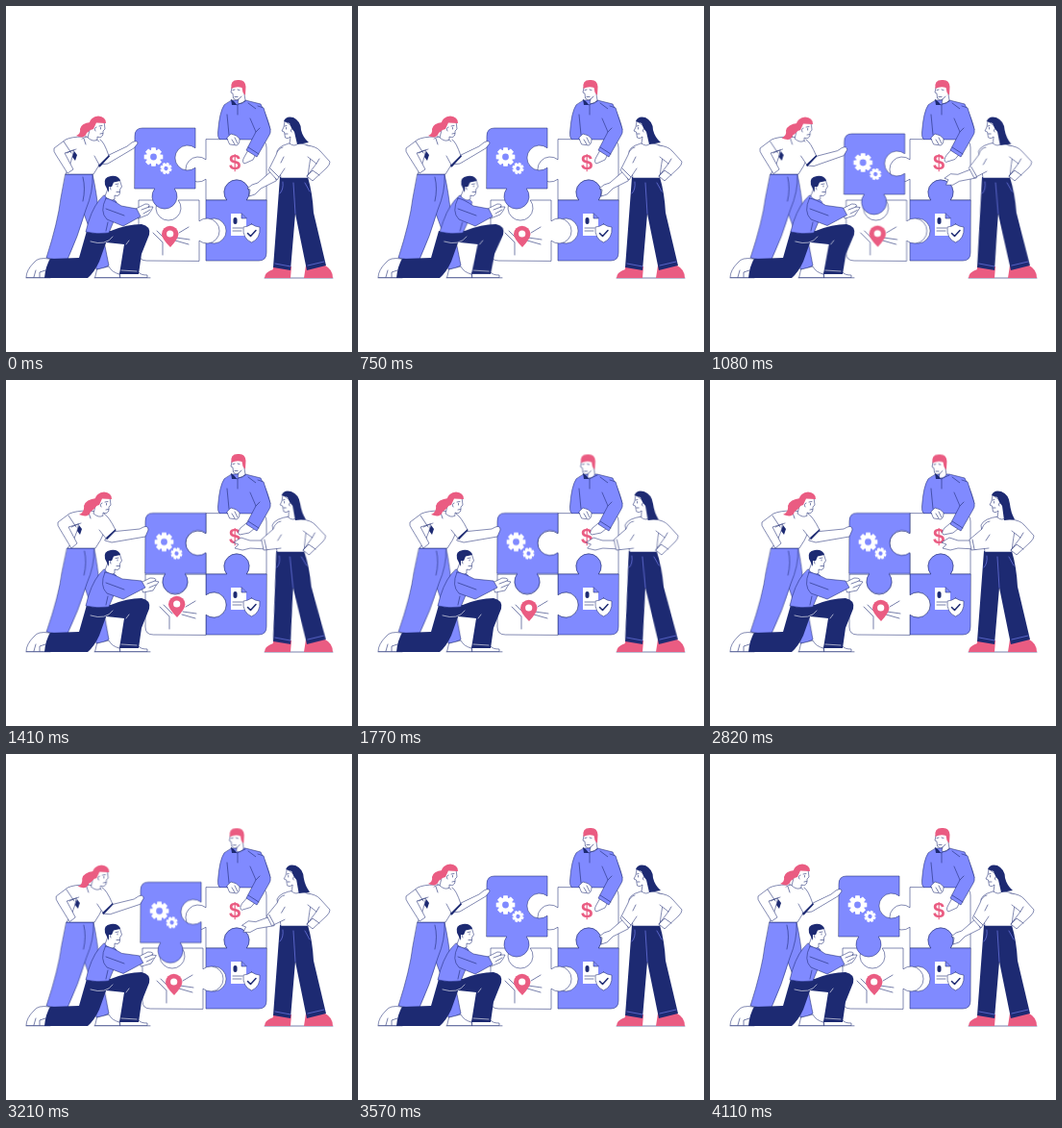
These frames come from a looping animation (360 px wide and 360 px high, 4.14 s). An HTML page:

```html
<!DOCTYPE html>
<html lang="en">
<head>
<meta charset="utf-8">
<title>Team puzzle</title>
<style>
html, body { margin: 0; width: 100%; height: 100%; overflow: hidden; background: #fff; }
svg {
  --ink: #1d2a72; --blue: #808aff; --pink: #ea5c82;
  display: block; width: 100vw; height: 100vh;
  stroke-linejoin: round; stroke-linecap: round;
}
.w, .b { stroke: var(--ink); stroke-width: .55; }
.w { fill: #fff; }
.b { fill: var(--blue); }
.n { fill: var(--ink); }
.p { fill: var(--pink); }
.l { fill: none; stroke: var(--ink); stroke-width: .6; }
.x { fill: none; stroke: #fff; stroke-width: .6; }
.move, .skew, .morph, .nod, .lean, .push, .hop { animation: 4140ms ease-in-out infinite; }
.move { animation-name: move; }
.skew { animation-name: skew; transform-origin: 70px 272px; }
.morph { d: var(--a); animation-name: morph; }
.nod { animation-name: nod; }
.lean { animation-name: lean; transform-origin: 305px 274px; }
.push { animation-name: push; transform-origin: 110px 281px; }
.hop { animation-name: hop; }
/* apart, together, apart */
@keyframes move {
  0%, 19%, 85%, 100% { transform: translate(0, 0); }
  33%, 71% { transform: translate(var(--x), var(--y, 0px)); }
}
@keyframes skew {
  0%, 19%, 85%, 100% { transform: skewX(0deg); }
  33%, 71% { transform: skewX(-1deg); }
}
@keyframes morph {
  0%, 19%, 85%, 100% { d: var(--a); }
  33%, 71% { d: var(--b); }
}
@keyframes nod {
  0%, 34%, 85%, 100% { transform: translate(0, 0); }
  46%, 71% { transform: translate(-3px, .5px); }
}
@keyframes lean {
  0%, 19%, 67%, 100% { transform: skewX(0deg); }
  33% { transform: skewX(2.3deg); }
  53% { transform: skewX(1.6deg); }
}
@keyframes push {
  0%, 5%, 33%, 100% { transform: skewX(0deg); }
  18% { transform: skewX(-2.7deg); }
}
@keyframes hop {
  0%, 24%, 42%, 100% { transform: translateY(0); }
  34% { transform: translateY(-4px); }
}
</style>
</head>
<body>
<svg viewBox="0 0 360 360">
<defs>
  <path id="piece" d="M145 147Q145 139 153 139H208V159.8A13 13 0 1 0 208 180.2V202H186.2A13 13 0 1 1 165.8 202H145Z"/>
  <path id="tooth" d="M-2.2-9.8H2.2L2.8-5H-2.8Z"/>
  <g id="gear">
    <circle r="5.4" fill="none" stroke="#fff" stroke-width="4"/>
    <g fill="#fff">
      <use href="#tooth"/><use href="#tooth" transform="rotate(45)"/>
      <use href="#tooth" transform="rotate(90)"/><use href="#tooth" transform="rotate(135)"/>
      <use href="#tooth" transform="rotate(180)"/><use href="#tooth" transform="rotate(225)"/>
      <use href="#tooth" transform="rotate(270)"/><use href="#tooth" transform="rotate(315)"/>
    </g>
  </g>
</defs>

<path class="l" d="M21 282.8H46M92 282.8H150M269 283H340"/>

<!-- standing woman, left -->
<g class="skew">
  <path class="b" d="M77 175H90Q94 192 97 220L107 270Q101 274 94 274L88 235L77 205Z"/>
  <path class="b" d="M62 175H90Q91 193 83 212Q75 240 63 266L42 262Q54 225 57 200Z"/>
  <path class="l" d="M80 178Q83 190 80 203"/>
</g>
<path class="w" d="M95 274L107 271Q110 277 118 279L119 282.5H93Z"/>
<path class="w morph" style="--a:path('M83 136Q98 138 101 146Q103 158 91 175H62Q67 166 69 157Q71 140 83 136Z');--b:path('M88 136Q102 138 104 146Q105 158 93 175H64Q72 166 74 157Q76 140 88 136Z')"/>
<path class="w morph" style="--a:path('M80 136Q68 136 62 139L50 148Q49 151 52 155L64 174L70 170L61 153L73 149');--b:path('M85 136Q73 136 66 139L54 148Q53 151 56 155L68 175L74 170L65 153L78 149')"/>
<g class="move" style="--x:5px">
  <path class="l" d="M60 141L68 153M81 138L83 144M63 153L70 150"/>
  <path class="n" d="M69 157L71 151L74 155L72 161Z"/>
</g>
<g class="move" style="--x:6px;--y:2px">
  <path class="w" d="M88 125L85 137Q91 142 95 139L95 136Q100 138 101 133L101 130L103 128L102 120L91 118Z"/>
  <path class="p" d="M86 123Q88 115 96 114.500Q104 115 104 122L94 121.500L91 128L88 129Z"/>
  <path class="l" d="M97 125L100 124.500M98.500 126.500V128M98 133L100.500 132.500M94 126Q91 127 93 130"/>
</g>
<path class="p morph" style="--a:path('M88 121Q78 122 77 128Q78 133 73 135Q82 139 84 132Q88 130 90 125Z');--b:path('M94 123Q83 124 81 131Q82 137 76 140Q86 144 88 137Q94 133 96 128Z')"/>

<!-- man behind the puzzle -->
<path class="b" d="M235 98L249 98L265 102Q273 118 275 129L262 140H226Q220 140 220.500 132Q222 110 227 103Z"/>
<g class="nod">
  <path class="w" d="M235 85L234 90L236 91L236.500 96Q239 99 242 97L241 101Q246 103 249 98L248 92V82H237Z"/>
  <path class="p" d="M234.500 86Q233 77 241 77Q249 76 249.500 84L249 93L246.500 90L245.500 85Q240 83 234.500 86Z"/>
  <path class="l" d="M236 87.500L238 87M241 87L243 87.500M238 94.500H241M242 97L245 94"/>
</g>
<path class="l" d="M234 97.500L240 103L249 99M241 103V113M252 101L260 107M230 113L232 134"/>
<path class="n" d="M234 97L238 100L240 103L235 103Z"/>

<!-- puzzle -->
<use href="#piece" class="w" transform="rotate(90 208 202)"/>
<text x="238" y="170" text-anchor="middle" fill="#ea5c82" font-family="'Liberation Sans', Arial, sans-serif" font-size="22" font-weight="700">$</text>
<use href="#piece" class="b" transform="rotate(180 208 202)"/>
<path fill="#fff" d="M234 216H245L250 221V239H234Z"/>
<path class="b" d="M245 216V221H250Z"/>
<rect class="n" x="236.5" y="220" width="4" height="7" rx="2"/>
<path class="l" d="M236 231H246M236 234H245"/>
<path class="w" d="M255.500 227Q260 230 264 230Q265 242 255.500 246Q246 242 247 230Q251 230 255.500 227Z"/>
<path class="l" style="stroke-width:1.5" d="M251.500 236.500L254.500 239.500L260 233.500"/>

<g class="move" style="--x:7px">
  <use href="#piece" class="w" transform="translate(-7 0) rotate(270 208 202)"/>
  <path class="l" d="M153 236L163 246V259M157 234L166 243M176 244L190 248M177 241L191 243M180 236L190 230"/>
  <g class="hop">
    <path class="p" d="M171 251Q162 242 162 237.500A8.700 8.700 0 0 1 179.400 237.500Q179.400 242 171 251Z"/>
    <circle cx="170.700" cy="237" r="3.600" fill="#fff"/>
  </g>
</g>
<g class="move" style="--x:11px;--y:11.500px">
  <use href="#piece" class="b" transform="translate(-11 -12)"/>
  <use href="#gear" transform="translate(153.500 157)"/>
  <use href="#gear" transform="translate(166.500 169) rotate(20) scale(.62)"/>
</g>

<!-- hands of the man behind -->
<path class="w" d="M230 137L234 133Q240 134 243 138Q243 144 240 145L233 144Z"/>
<path class="l" d="M235 139L238 144M238 137L241 143"/>
<path class="w morph" style="--a:path('M252 150L248 157Q245 162 248 164L257 160L260 154Z');--b:path('M250 149L244 154Q240 159 243 161L253 159L259 154Z')"/>
<path class="b" d="M262 104L268 106L275 128Q276 132 273 136L261 157L250 150L260 131L254 117"/>
<path class="l" d="M252 147L263 154M260 131L264 127"/>

<!-- front arm of the left woman -->
<path class="w morph" style="--a:path('M103 157L126 146L131 142Q137 139 137 143L133 148L106 164L98 165Z');--b:path('M109 158L139 155L143 153Q148 151 148 156L145 163L110 169L103 167Z')"/>
<path class="w morph" style="--a:path('M98 139Q102 141 107 156L98 167L92 156');--b:path('M102 139Q107 142 114 156L105 166L97 156')"/>
<path class="n morph" style="--a:path('M96 166L107 155L108 156.5L97 168Z');--b:path('M104 164L114 155L114.5 156.5L105 166Z')"/>

<!-- kneeling man -->
<path class="w" d="M45 263Q33 261 29 267Q21 275 21 282.500H43Z"/>
<path class="l" d="M29 282L31 275M35 282V277L41 275"/>
<path class="n" d="M84 234L107 238L97 266Q92 277 85 283H40Q41 271 46 263L76 262Z"/>
<path class="w" d="M119 277H138Q140 280 147 280V282.500H119Z"/>
<g class="push">
  <path class="n" d="M85 236L109 234Q126 227 141 227Q151 229 149 238L141 258L138 279H118L123 248L104 246Q91 249 85 244Z"/>
  <path class="x" d="M88 245Q104 250 111 240M125 248L128 244M120 275L136 276"/>
  <path class="b" d="M102 197Q110 198 115 204L112 224L107 236Q94 238 83 235Q88 213 97 202Z"/>
  <path class="w" d="M106 190L103 198Q109 204 113 201L113 197Q118 199 118.500 194V191L120.500 188L118 180H106Z"/>
  <path class="n" d="M103 186Q101 178 109 177Q117 176 119 182L112 183.500L110 188L107 188V194Z"/>
  <path class="l" d="M114 185.500L117 185M116 187V188M115 193.500H118M110 187Q107 188 109 191"/>
  <path class="l" d="M106 225L104 234"/>
</g>
<path class="w morph" style="--a:path('M135 211L145 206Q151 206 148 209L153 209L151 213L148 217L138 221Z');--b:path('M140 211L150 206Q158 206 155 209L159 210L156 214L153 219L143 221Z')"/>
<path class="l morph" style="--a:path('M141 212L149 209M143 216L150 212');--b:path('M147 212L155 209M149 216L156 213')"/>
<path class="b morph" style="--a:path('M104 200Q110 201 120 208L136 211L140 219L122 229L105 222Q97 214 104 200Z');--b:path('M103 200Q110 201 121 207L141 209L145 216L122 228L105 222Q97 214 103 200Z')"/>
<path class="l" d="M104 211L123 218"/>

<!-- standing woman, right -->
<path class="p" d="M278 271H297L296 283H269Q269 277 278 274ZM312 270H332Q340 274 340 283H310Z"/>
<g class="lean">
  <path class="n" d="M285 178H314Q319 195 320 215L333 270L313 275L301 216L296 275L278 272L283 205Z"/>
  <path class="x" d="M299 184L301 216M288 183Q289 191 285 195M311 184L316 193M280 268L296 271M314 270L331 266" style="stroke:#808aff"/>
  <path class="w" d="M300 142Q285 144 282 151L286 179H314Q315 166 319 147Q311 143 300 142Z"/>
  <path class="w" d="M313 145Q323 146 327 151L337 162Q337 165 334 168L319 182L313 177L323 164L314 157"/>
  <path class="l" d="M323 164L326 159M313 177L319 171L326 176"/>
  <g class="move" style="--x:4px">
    <path class="w" d="M290 120L289 126L287 130L289.500 131L290.500 137Q293 139 296 136L295 143Q300 147 304 143L302 129Z"/>
    <path class="l" d="M290 125L292 124.500M291.500 126.500V128M290.500 133H293M298 128Q295 128 297 131"/>
  </g>
  <path class="n morph" style="--a:path('M289 120Q291 114 299 116Q307 120 307 129Q309 137 315 142L303 144L300 131L297 127L295 122Z');--b:path('M293 120Q295 114 303 116Q311 119 312 129Q313 138 317 145L306 146L304 131L301 127L299 122Z')"/>
  <path class="w morph" style="--a:path('M277 171L262 184L256 186L251 190L254 191L253 198L259 196L265 190L281 182Z');--b:path('M275 167L258 167L249 164L241 169L246 171L242 175L250 177L258 175L277 176Z')"/>
  <path class="w morph" style="--a:path('M288 147Q283 148 281 155L273 171L282 181L290 169');--b:path('M291 147Q285 148 283 155L270 166L272 177L290 175')"/>
  <path class="l morph" style="--a:path('M275 169L284 178M286 163L289 157');--b:path('M273 166L275 176M287 167L291 161')"/>
</g>
</svg>
</body>
</html>
```
